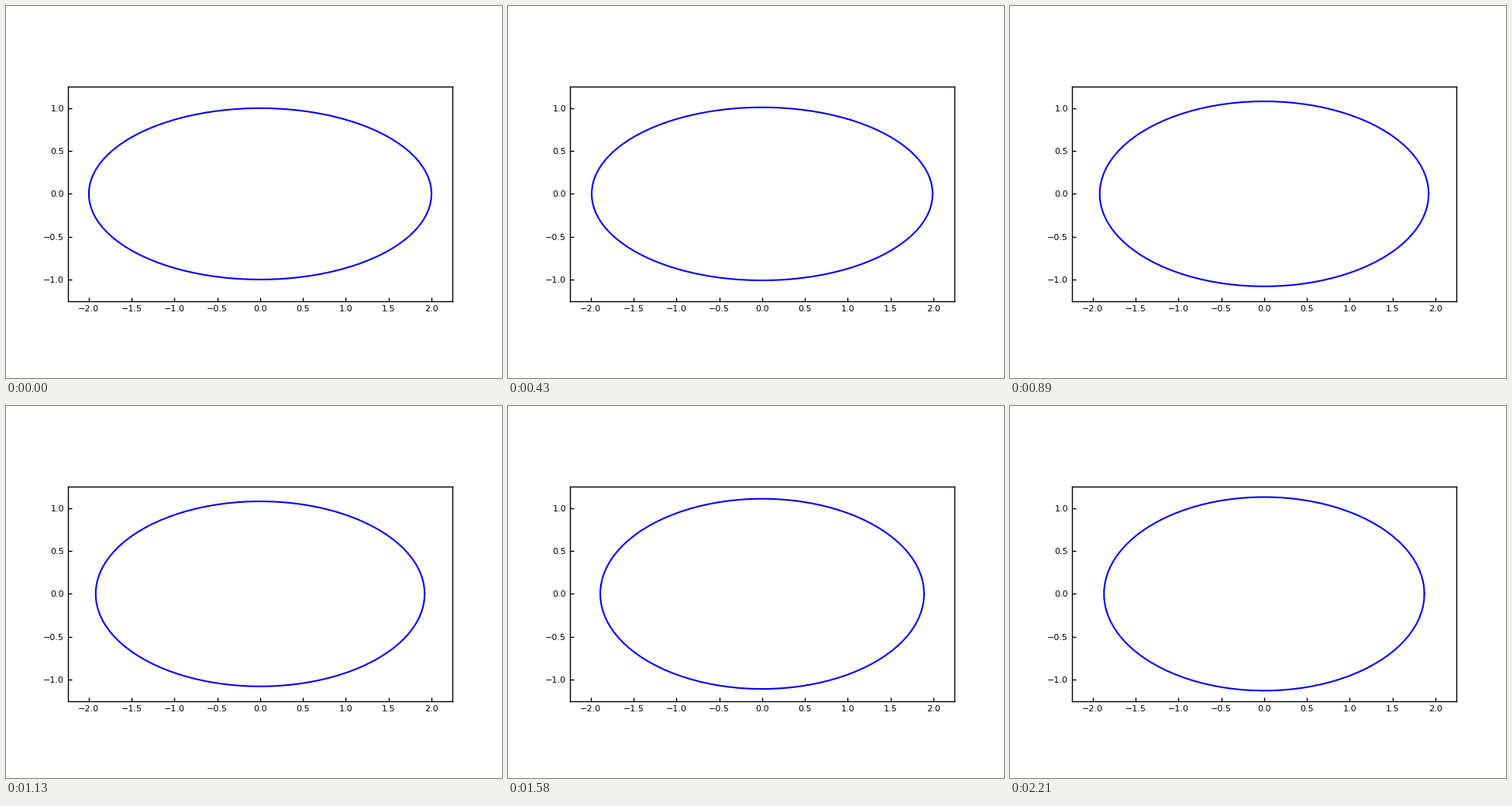
These frames come from a looping animation (640x480 px, 2230 ms). A matplotlib script:

```python
import numpy as np
import matplotlib.pyplot as plt
from matplotlib.animation import FuncAnimation

plt.rcParams.update({
    "font.family": "DejaVu Sans",
    "font.size": 8,
    "axes.linewidth": 1.0,
    "xtick.direction": "in",
    "ytick.direction": "in",
    "xtick.major.width": 1.0,
    "ytick.major.width": 1.0,
})

LOOP, TICK = 2230, 10  # ms
STEP = 0.01

# Each leg of the random walk: duration in ms, net steps, back-and-forth pairs
LEGS = [
    (260, 3, 3),
    (260, -6, 2),
    (100, -2, 0),
    (510, -3, 7),
    (450, -3, 6),
    (120, 1, 0),
    (300, -3, 2),
    (210, 0, 4),
]


def build_walk(seed=4):
    rng = np.random.default_rng(seed)
    times, shifts = [0], [0]
    for ms, net, pairs in LEGS:
        steps = [np.sign(net)] * abs(net) + [1, -1] * pairs
        rng.shuffle(steps)
        count = len(steps)
        start = times[-1]
        times.extend(start + ms * i / count for i in range(1, count + 1))
        shifts.extend(shifts[-1] + np.cumsum(steps))
    return np.array(times), STEP * np.array(shifts)


times, shifts = build_walk()
theta = np.linspace(0, 2 * np.pi, 100)


def ellipse(a, b):
    return a * np.cos(theta), b * np.sin(theta)


fig, ax = plt.subplots(figsize=(6.4, 4.8), dpi=100)
fig.subplots_adjust(left=0.125, right=0.9, bottom=0.11, top=0.88)
ax.set_aspect("equal")

# The widest and tallest shapes set the view
line, = ax.plot(*ellipse(2.04, 1.14), color="blue", lw=1.5)
ax.autoscale_view()
ax.autoscale(False)
ax.set_xticks(np.arange(-2, 2.1, 0.5))
ax.set_yticks(np.arange(-1, 1.1, 0.5))


def draw(frame):
    pose = np.searchsorted(times, frame * TICK, side="right") - 1
    line.set_data(*ellipse(2 + shifts[pose], 1 - shifts[pose]))
    return line,


anim = FuncAnimation(fig, draw, frames=LOOP // TICK, interval=TICK,
                     repeat=True, repeat_delay=0, blit=True)
plt.show()
```
